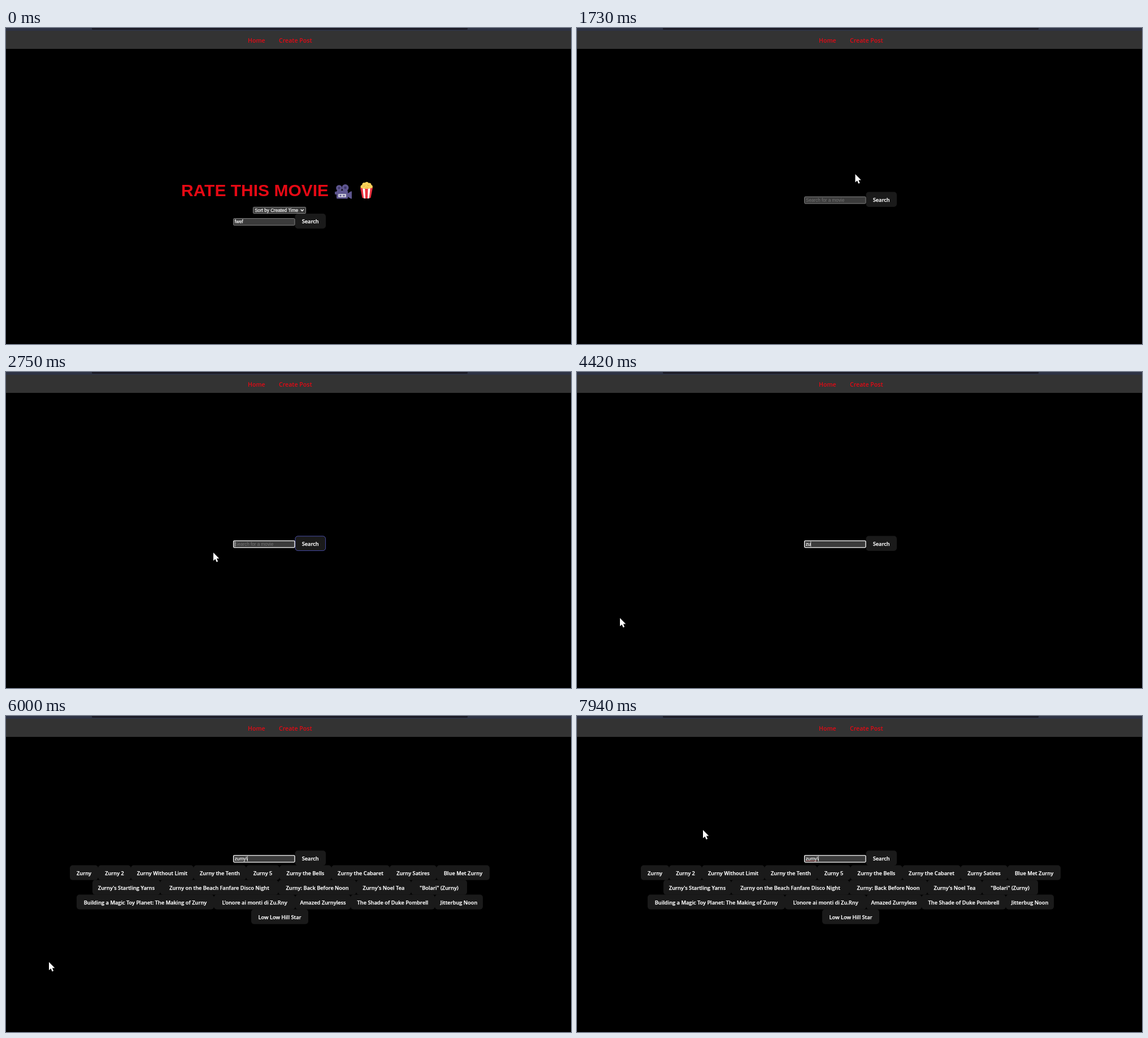
An HTML page for the animation above (8 s loop, 1000 px wide and 560 px high).

```html
<!DOCTYPE html>
<html lang="en">
<head>
<meta charset="utf-8">
<title>Rate this movie</title>
<style>
  html, body { margin: 0; width: 100%; height: 100%; overflow: hidden; background: #000; }
  svg { display: block; width: 1000px; height: 560px; }
  text { white-space: pre; }
  .ui { font: 600 9.25px "Open Sans", "Noto Sans", sans-serif; fill: #fff; stroke: #fff; stroke-width: .25px; }
  .nav { font: 600 10.6px "Open Sans", "Noto Sans", sans-serif; fill: #e50914; }
  .field { font: 8.15px "Liberation Sans", Arial, sans-serif; fill: #fff; }
  .strong { stroke: #fff; stroke-width: .2px; }
  .title { font: bold 30px "Liberation Sans", Arial, sans-serif; fill: #e50914; }
  .button { fill: #1a1a1a; }
  .pointer { fill: #fff; stroke: #000; paint-order: stroke; stroke-linejoin: round; }
</style>
</head>
<body>
<svg viewBox="0 0 1000 560" xmlns="http://www.w3.org/2000/svg">
  <rect width="1000" height="560"/>
  <rect width="1000" height="37" fill="#333"/>
  <rect width="1000" height="5" fill="#2e3344"/>
  <path d="M152 0H817V1.5Q817 3 815.5 3H153.5Q152 3 152 1.5Z" fill="#1a1a24"/>
  <text class="nav" x="428" y="25.8">Home</text>
  <text class="nav" id="link" x="483" y="25.8">Create Post</text>

  <g id="home">
    <text class="title" x="310" y="298">RATE THIS MOVIE</text>
    <g id="camera">
      <g fill="#5e568f">
        <circle cx="589.5" cy="283.5" r="5.3"/>
        <circle cx="600.5" cy="283" r="6"/>
        <rect x="582" y="290" width="5" height="5" rx="1"/>
        <rect x="585" y="288" width="20" height="14.5" rx="1.5"/>
        <path d="M604 293.5L610.5 289.5H612V302.5H610.5L604 298.5Z"/>
      </g>
      <g fill="#3d3668">
        <circle cx="589.5" cy="283.5" r="2"/>
        <circle cx="600.5" cy="283" r="2.3"/>
      </g>
      <rect x="588" y="294" width="14" height="6" rx="1" fill="#c9c8d6"/>
      <circle cx="592" cy="297" r="1.5" fill="#5e568f"/>
      <circle cx="598" cy="297" r="1.5" fill="#5e568f"/>
    </g>
    <g id="popcorn">
      <g fill="#fbd25a">
        <circle cx="631" cy="281.5" r="3.5"/>
        <circle cx="634" cy="277.5" r="3.6"/>
        <circle cx="638.5" cy="276" r="3.2"/>
        <circle cx="643" cy="278" r="3.5"/>
        <circle cx="645.5" cy="281.5" r="3.4"/>
        <rect x="631" y="278" width="14" height="7"/>
      </g>
      <path d="M632 280q2 2 4-1M639 278q2 3 4 1M636 283q2-2 5 0" fill="none" stroke="#e0a93a" stroke-width=".9"/>
      <path d="M627 283Q638 287 649 283L645.5 301Q638 303.5 630.5 301Z" fill="#e9323f"/>
      <path d="M631.3 284.3L635.3 285L636 302.3L633.3 301.8ZM640.7 285L644.7 284.3L642.7 301.8L640 302.3Z" fill="#fff"/>
    </g>
    <rect x="437.5" y="317.5" width="93" height="11" rx="1" fill="#3b3b3b" stroke="#858585"/>
    <text class="field strong" x="440.2" y="326">Sort by Created Time</text>
    <path d="M521.7 321.6L524.2 324.2L526.7 321.6" fill="none" stroke="#fff" stroke-width="1.4"/>
  </g>

  <g id="results"></g>

  <g id="form">
    <rect class="button" x="511.5" y="290.5" width="54.5" height="26.5" rx="5"/>
    <rect id="glow" x="511.9" y="290.9" width="53.7" height="25.7" rx="4.8" fill="none" stroke="#646cff" stroke-width=".9"/>
    <text class="ui" x="538.7" y="307.8" text-anchor="middle">Search</text>
    <rect id="box" x="402.6" y="299.1" width="108.4" height="12" rx="1.5" fill="#3b3b3b"/>
    <text class="field" id="hint" x="405" y="307.9" style="fill:#757575">Search for a movie</text>
    <text class="field strong" id="typed" x="404.8" y="307.9"></text>
    <path id="squiggle" fill="none" stroke="#e0393e" stroke-width=".6" opacity=".8"/>
    <rect id="caret" y="300.3" width=".8" height="9.2" fill="#fff"/>
  </g>

  <circle id="click" r="11.5" fill="#c8bc14" opacity=".75"/>
  <g id="cursor">
    <path id="arrow" class="pointer" d="M0 0V14.6L3.4 11.5L5.7 16.8L8.1 15.7L5.9 10.6H10.3Z"/>
    <path id="hand" class="pointer" d="M-1.3 1.2Q0 -.6 1.3 1.2V6.3Q2.6 5.4 3.6 6.7Q4.9 5.9 5.8 7.3Q7.6 6.7 8 8.8V12.5Q7.6 15 6.3 16V18H-.6V16.3L-4.6 11.2Q-5 9.2 -3 9.6L-1.3 11Z"/>
    <path id="beam" d="M-2.5 -6H2.5M0 -6V6M-2.5 6H2.5" fill="none" stroke="#fff" stroke-width=".9"/>
  </g>
</svg>
<script>
const LOOP = 8000;
const $ = id => document.getElementById(id);
const show = (id, on) => $(id).setAttribute("visibility", on ? "visible" : "hidden");

function add(parent, tag, attrs, label) {
  const el = document.createElementNS("http://www.w3.org/2000/svg", tag);
  for (const key in attrs) el.setAttribute(key, attrs[key]);
  if (label) el.textContent = label;
  parent.append(el);
}

// Each row: button edges, then the labels between them.
const rows = [
  [[113, 163, 221, 332, 425, 484, 576, 679, 762, 856],
   ["Zurny", "Zurny 2", "Zurny Without Limit", "Zurny the Tenth", "Zurny 5", "Zurny the Bells",
    "Zurny the Cabaret", "Zurny Satires", "Blue Met Zurny"]],
  [[153, 273, 482, 620, 717, 816],
   ["Zurny's Startling Yarns", "Zurny on the Beach Fanfare Disco Night", "Zurny: Back Before Noon",
    "Zurny's Noel Tea", "\"Bolari\" (Zurny)"]],
  [[125, 368, 512, 610, 759, 844],
   ["Building a Magic Toy Planet: The Making of Zurny", "L'onore ai monti di Zu.Rny",
    "Amazed Zurnyless", "The Shade of Duke Pombrell", "Jitterbug Noon"]],
  [[434, 535], ["Low Low Hill Star"]]
];
rows.forEach(([edges, labels], r) => labels.forEach((label, i) => {
  const x = edges[i], width = edges[i + 1] - x, y = 264.6 + r * 26;
  add($("results"), "rect", { class: "button", x, y, width, height: 26.2, rx: 5 });
  add($("results"), "text", { class: "ui", x: x + width / 2, y: y + 17.2, "text-anchor": "middle" }, label);
}));

let wave = "M405 309.2";
for (let i = 0; i < 10; i++) wave += "l1 -.8l1 .8";
$("squiggle").setAttribute("d", wave);

// Search field: time, text, caret visible
const typing = [
  [0, "", 0], [2280, "", 1], [2817, "", 0], [3290, "z", 1], [3620, "zu", 1],
  [4080, "z", 1], [4150, "z", 0], [4420, "zu", 1], [4950, "zu", 0],
  [5080, "zur", 1], [5210, "zurn", 1], [5600, "zurny", 1], [5730, "zurny\\", 1],
  [6330, "zurny\\", 0], [6790, "zurny\\", 1], [7330, "zurny\\", 0], [7860, "zurny\\", 1]
];

// Pointer moves: redraw interval, then time, x, y
const moves = [
  [68.5, [[420, 760, 393], [700, 700, 280], [950, 600, 110], [1105, 537, 29], [1173, 532, 27]]],
  [68.5, [[1250, 532, 27], [1387, 530, 50], [1592, 512, 160], [1729.5, 492.5, 259], [1935, 470, 304]]],
  [67, [[2080, 470, 304], [2281, 480, 304], [2348, 485, 304], [2482, 535, 303], [2616, 515, 304],
        [2683, 450, 308], [2750, 367, 320], [2817, 76, 436]]],
  [70, [[6990, 150, 350], [7060, 382, 40], [7130, 390, -40]]],
  [68.3, [[7530, 340, -6], [7735, 262, 130], [7939, 223, 202]]]
];

const latest = (list, t, time) => list.filter(item => time(item) <= t).pop();

function pointerAt(t) {
  const move = latest(moves, t, m => m[1][0][0]);
  if (!move) return [0, -40];
  const [step, keys] = move, start = keys[0][0];
  const held = start + Math.floor((t - start) / step) * step;
  const i = keys.findIndex(k => k[0] > held);
  if (i < 0) return keys[keys.length - 1].slice(1);
  const [t0, x0, y0] = keys[i - 1], [t1, x1, y1] = keys[i];
  const p = (held - t0) / (t1 - t0);
  return [x0 + (x1 - x0) * p, y0 + (y1 - y0) * p];
}

const within = (x, y, l, t, r, b) => x >= l && x <= r && y >= t && y <= b;
const between = (t, a, b) => t >= a && t < b;

function draw(t) {
  const home = t < 1320, found = t >= 6000;
  show("home", home);
  show("results", found);
  $("form").setAttribute("transform", `translate(0 ${home ? 38.5 : found ? -52 : 0})`);

  const [, text, caret] = latest(typing, t, s => s[0]);
  const focused = t >= 2280;
  $("typed").textContent = home ? "fwef" : text;
  show("hint", !home && !text);
  show("caret", caret);
  $("caret").setAttribute("x", 404.8 + (text ? $("typed").getComputedTextLength() : 0));
  show("squiggle", t >= 6790);
  $("box").setAttribute("stroke", focused ? "#fff" : "#858585");
  $("box").setAttribute("stroke-width", focused ? 1.3 : 1);

  const rise = (t - 2415) / 250, fall = (2890 - t) / 207;
  $("glow").setAttribute("opacity", Math.max(0, Math.min(1, rise, fall)));

  const [x, y] = pointerAt(t);
  const onLink = within(x, y, 483, 14, 541, 32);
  const onPage = !home && !found;
  const hand = onLink || onPage && within(x, y, 512, 290, 566, 317);
  const beam = onPage && within(x, y, 402, 298, 511, 312);
  $("link").style.fill = onLink ? "#fff" : "";
  $("cursor").setAttribute("transform", `translate(${x} ${y})`);
  show("hand", hand);
  show("beam", beam);
  show("arrow", !hand && !beam);

  show("click", between(t, 1173, 1318) || between(t, 2280, 2348));
  $("click").setAttribute("cx", x);
  $("click").setAttribute("cy", y);
}

const begin = performance.now();
function tick() {
  draw((performance.now() - begin) % LOOP);
  requestAnimationFrame(tick);
}
tick();
</script>
</body>
</html>
```
